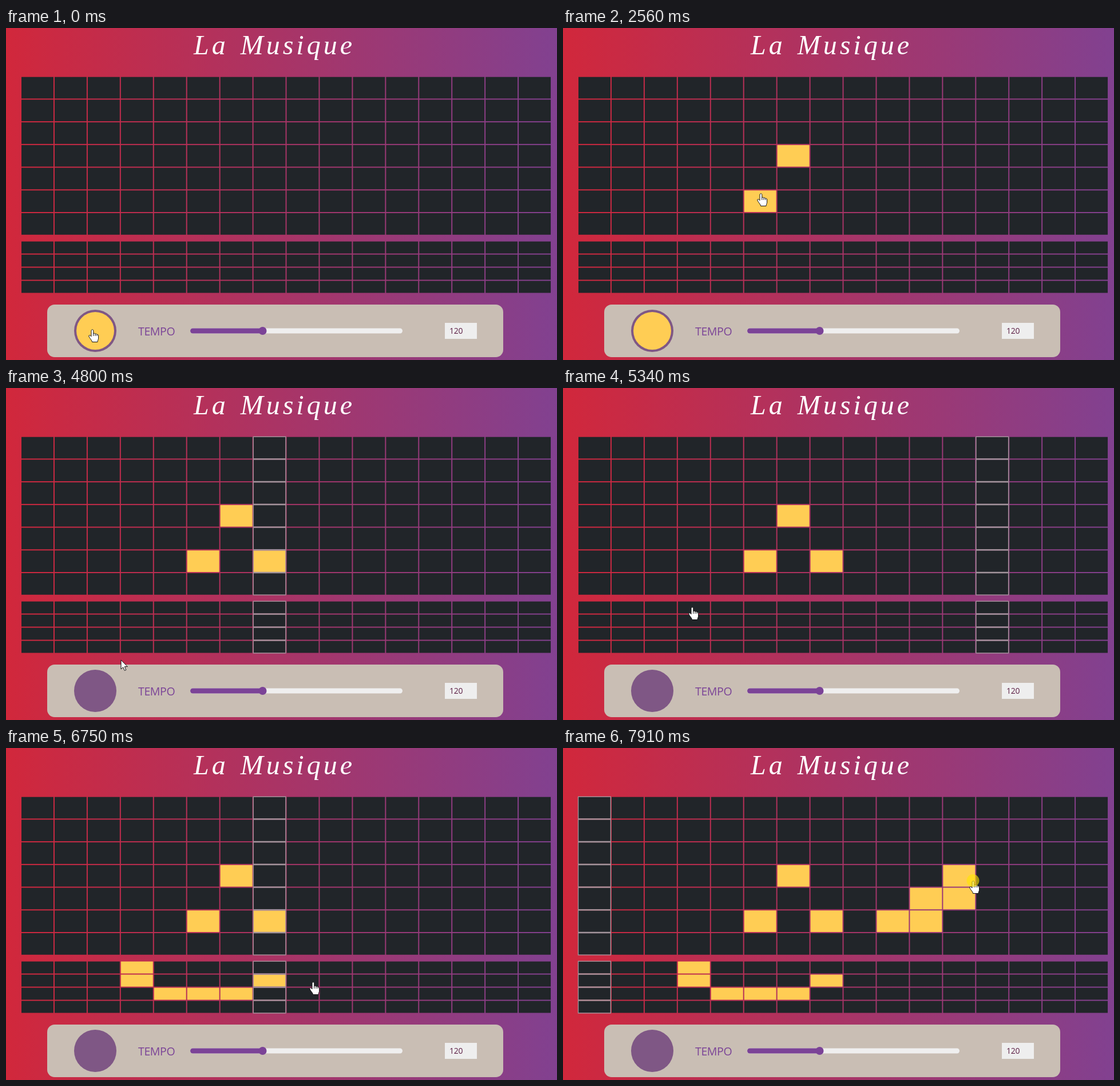
Animation, 963 px wide and 581 px high, one loop 7990 ms. Source, as an HTML page:

```html
<!DOCTYPE html>
<html lang="fr">
<head>
<meta charset="utf-8">
<title>La Musique</title>
<style>
  html, body { margin: 0; width: 100%; height: 100%; overflow: hidden; background: #a93561; }
  svg { display: block; width: 100%; height: 100%; }
  .title { font: italic 48px "Liberation Serif", serif; letter-spacing: 5px; word-spacing: 4px; fill: #fff; }
  .label { font: 19.5px "Open Sans", sans-serif; letter-spacing: -.4px; fill: #7b4397; }
  .value { font: 14px "Open Sans", sans-serif; letter-spacing: -.3px; fill: #5c1f45; }
  .cell { fill: #212529; }
  .cell.on { fill: #ffcd54; }
  #playhead rect { fill: none; stroke: #a3949c; stroke-width: 1.4; }
  #hand, #arrow { fill: #fff; stroke: #111; stroke-linejoin: round; }
</style>
</head>
<body>
<svg viewBox="0 0 963 581" preserveAspectRatio="none">
  <defs>
    <linearGradient id="sky" gradientUnits="userSpaceOnUse" x1="-130" x2="1040" y1="0" y2="0">
      <stop offset="0" stop-color="#dc2430"/>
      <stop offset="1" stop-color="#7b4397"/>
    </linearGradient>
  </defs>
  <rect width="963" height="581" fill="url(#sky)"/>
  <text class="title" x="328" y="46">La Musique</text>
  <g id="cells"></g>
  <g id="playhead"></g>

  <rect x="72" y="484" width="797" height="92" rx="13" fill="#c9beb4"/>
  <circle cx="156" cy="530" r="37" fill="#7f5785"/>
  <circle id="button" cx="156" cy="530" r="33" fill="#ffcd54"/>
  <text class="label" x="231" y="538">TEMPO</text>
  <rect x="322" y="525.5" width="371" height="9" rx="4.5" fill="#efefef"/>
  <rect x="322" y="525.5" width="126" height="9" rx="4.5" fill="#7b4397"/>
  <circle cx="448.5" cy="530" r="7" fill="#7b4397"/>
  <rect x="767" y="516" width="56" height="28" fill="#eee"/>
  <text class="value" x="775" y="535">120</text>

  <g id="cursor">
    <path id="hand" d="M-2 1.8C-2-.8 1.8-.8 1.8 1.8V7.2C2.2 5.8 5 6 5 7.8C5.6 6.6 8 7 8 8.8C8.8 7.8 10.6 8.4 10.6 10V15C10.6 17.5 9 18.5 9 21.5H-.5C-.5 19-3 17-4.5 14.5C-5.5 12.6-7 11-5.8 10C-4.5 9-3 10.5-2 11.8ZM1.8 7V11M5 8V11M8 9V11"/>
    <path id="arrow" d="M0 0V16L3.7 12.6L6.3 18.5L8.8 17.4L6.3 11.6H11.3Z"/>
    <circle id="halo" cx="-.5" cy="-1" r="11" fill="#ffe600" fill-opacity=".6"/>
  </g>
</svg>
<script>
const LOOP = 7990, PLAY = 3720, FIRST_BEAT = 3858, BEAT = 123.5;
const COLS = 16, MELODY = 7, ROWS = 11, LEFT = 26, COL_W = 57.94;
const $ = id => document.getElementById(id);

// Melody rows come first, the lower drum rows after a gap.
function rowBox(r) {
  const [top, height] = r < MELODY ? [84.7 + 39.72 * r, 39.72] : [372.6 + 22.98 * (r - MELODY), 22.98];
  return { top, height };
}

function addRect(parent, c, r, inset, cls) {
  const el = document.createElementNS('http://www.w3.org/2000/svg', 'rect');
  const { top, height } = rowBox(r);
  const attrs = {
    x: LEFT + COL_W * c + inset, y: top + inset,
    width: COL_W - 2 * inset, height: height - 2 * inset, class: cls
  };
  for (const k in attrs) el.setAttribute(k, attrs[k]);
  parent.appendChild(el);
  return el;
}

const cells = [];
for (let r = 0; r < ROWS; r++) {
  for (let c = 0; c < COLS; c++) {
    cells.push({ el: addRect($('cells'), c, r, 1, 'cell'), paintedAt: Infinity });
  }
  addRect($('playhead'), 0, r, .6, 'mark');
}

function cellAt(x, y) {
  const c = Math.floor((x - LEFT) / COL_W);
  if (c < 0 || c >= COLS) return null;
  for (let r = 0; r < ROWS; r++) {
    const { top, height } = rowBox(r);
    if (y >= top && y < top + height) return cells[r * COLS + c];
  }
  return null;
}

// Pointer stops: [arrive, x, y, leave]
const stops = [
  [0, 151, 528, 200], [860, 432, 210, 960], [1320, 387, 226, 2190],
  [2410, 346, 290, 2590], [2870, 449, 296, 3050], [3560, 165, 525, 4580],
  [4800, 201, 476], [5360, 226, 384, 5530],
  [5690, 264, 425], [5850, 388, 429], [5950, 436, 418], [6030, 456, 410, 6400],
  [6750, 537, 410], [7130, 580, 303, 7290],
  [7500, 636, 290], [7700, 670, 262], [7910, 717, 233, LOOP]
];
const clicks = [1870, 2410, 2870, PLAY].map(t => [t, t + 150]);
const drags = [[5530, 6100], [7290, LOOP]];

const within = (t, spans) => spans.some(([from, to]) => t >= from && t < to);

function pointer(t) {
  const next = stops.findIndex(s => s[0] > t);
  const [arrive, x, y, leave = arrive] = stops.at(next < 0 ? -1 : next - 1);
  if (next < 0 || t <= leave) return [x, y];
  const [end, x1, y1] = stops[next];
  let k = (t - leave) / (end - leave);
  if (!within(t, drags)) k = k * k * (3 - 2 * k);
  return [x + (x1 - x) * k, y + (y1 - y) * k];
}

// A pressed pointer paints every cell it passes over.
for (let t = 0; t < LOOP; t += 10) {
  const cell = within(t, [...clicks, ...drags]) && cellAt(...pointer(t));
  if (cell) cell.paintedAt = Math.min(cell.paintedAt, t);
}

const show = (id, on) => $(id).setAttribute('visibility', on ? 'visible' : 'hidden');
const move = (id, x, y) => $(id).setAttribute('transform', `translate(${x} ${y})`);

function draw(t) {
  for (const cell of cells) cell.el.classList.toggle('on', t >= cell.paintedAt);

  const beat = Math.floor((t - FIRST_BEAT) / BEAT);
  show('playhead', beat >= 0);
  move('playhead', Math.max(beat, 0) % COLS * COL_W, 0);
  show('button', t < PLAY);

  const [x, y] = pointer(t).map(Math.round);
  const hand = cellAt(x, y) || Math.hypot(x - 156, y - 530) < 37;
  move('cursor', x, y);
  show('hand', hand);
  show('arrow', !hand);
  show('halo', within(t, [...clicks, ...drags]));
}

const start = performance.now();
function tick() {
  draw((performance.now() - start) % LOOP);
  requestAnimationFrame(tick);
}
tick();
</script>
</body>
</html>
```
